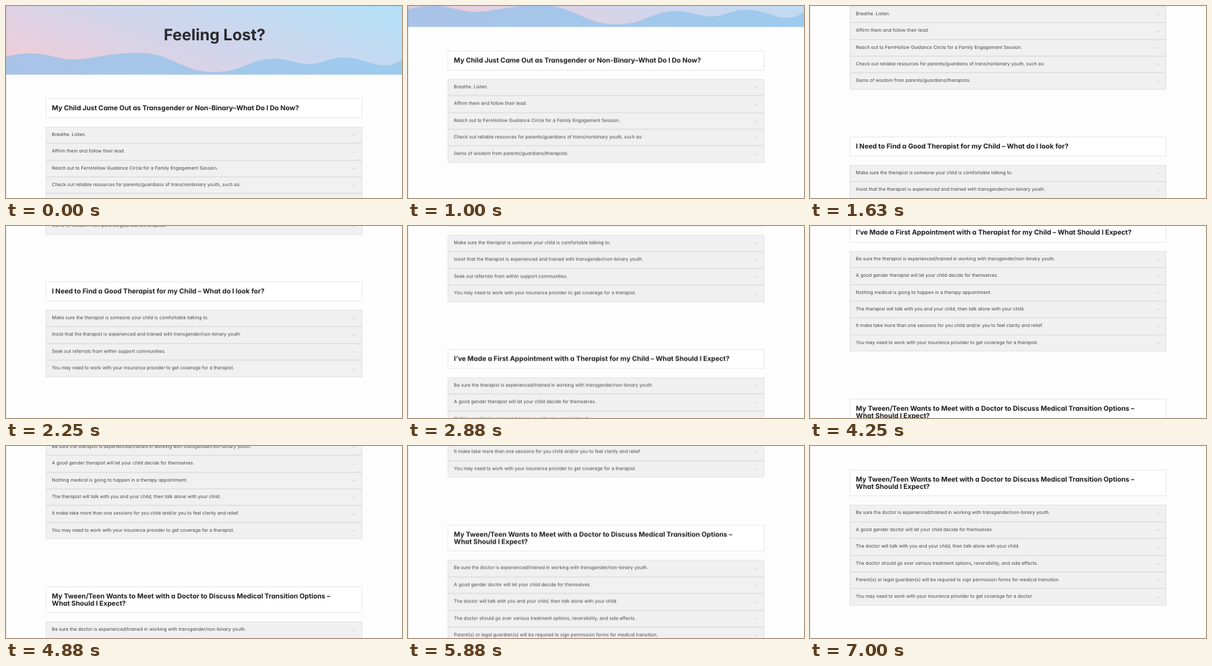
Recreate the animation shown at these times as an HTML page. Size 600 by 291 pixels, loop 7.76 s.

```html
<!DOCTYPE html>
<html lang="en">
<head>
<meta charset="utf-8">
<title>Feeling Lost?</title>
<style>
  * { box-sizing: border-box; margin: 0; padding: 0; }

  html, body {
    width: 100%;
    height: 100%;
    overflow: hidden;
    background: #fdfdfd;
  }

  body {
    position: relative;
    font-family: Inter, "Open Sans", sans-serif;
    font-feature-settings: "cv11";
    font-optical-sizing: none;
    text-rendering: geometricPrecision;
    white-space: nowrap;
  }

  /* thin window edge */
  body::after {
    content: "";
    position: absolute;
    inset: 0 auto 0 0;
    width: 1px;
    background: rgba(120, 120, 130, .16);
  }

  .page {
    position: absolute;
    top: 0;
    left: 0;
    width: 600px;
    height: 1120px;
    padding: 140px 60px 0;
    animation: scroll 7760ms steps(1) -3ms infinite;
  }

  .hero {
    position: absolute;
    top: 0;
    left: 0;
    width: 600px;
    height: 104px;
    background: linear-gradient(20deg, #f6ccd5, #d3d4ea 45%, #b2e0f7);
  }

  .hero svg { position: absolute; top: 0; left: 0; }

  h1 {
    position: absolute;
    top: 30px;
    left: 239px;
    font-size: 23.9px;
    line-height: 28px;
    font-weight: 700;
    color: #2a2a2c;
  }

  section { margin-bottom: 71.5px; }

  h2 {
    margin-bottom: 13.2px;
    padding: 9.1px 8.6px 7.5px;
    border: 1px solid #e7e7e7;
    background: #fff;
    font-size: 10.2px;
    line-height: 11px;
    font-weight: 700;
    color: #1c1c1e;
  }

  ul { list-style: none; }

  li {
    position: relative;
    height: 25.4px;
    padding-left: 8.6px;
    border: 1px solid #e2e2e2;
    background: #f0f0f0;
    font-size: 7.03px;
    line-height: 21.6px;
    color: #444;
  }

  li::after {
    content: "";
    position: absolute;
    top: 9.4px;
    right: 10.5px;
    width: 3px;
    height: 3px;
    border: solid #d2d2d2;
    border-width: 0 1px 1px 0;
    transform: scaleY(.6) rotate(45deg);
  }

  /* the page moves in ticks of 125 ms */
  @keyframes scroll {
    0%, 4.832% { transform: translateY(0); }
    6.443%  { transform: translateY(-4px); }
    8.054%  { transform: translateY(-13px); }
    9.665%  { transform: translateY(-28px);    animation-timing-function: steps(7); }
    20.941% { transform: translateY(-183px);   animation-timing-function: steps(10); }
    37.049% { transform: translateY(-410.5px); animation-timing-function: steps(3); }
    41.881% { transform: translateY(-481px);   animation-timing-function: steps(2); }
    45.103% { transform: translateY(-525px); }
    46.714% { transform: translateY(-540px); }
    48.325% { transform: translateY(-540px);   animation-timing-function: steps(4); }
    54.768% { transform: translateY(-602px);   animation-timing-function: steps(5); }
    62.822% { transform: translateY(-651px);   animation-timing-function: steps(3); }
    67.655% { transform: translateY(-711px); }
    69.265% { transform: translateY(-727px); }
    70.876% { transform: translateY(-737px); }
    72.487% { transform: translateY(-740.5px); }
    74.098% { transform: translateY(-740.5px); }
    75.709% { transform: translateY(-744.5px); animation-timing-function: steps(6); }
    85.374% { transform: translateY(-802.5px); }
    86.985% { transform: translateY(-813px); }
    88.595% { transform: translateY(-822px); }
    90.206%, 100% { transform: translateY(-828px); }
  }
</style>
</head>
<body>
<div class="page">
  <header class="hero">
    <svg width="600" height="104" viewBox="0 0 600 104">
      <defs>
        <linearGradient id="sea">
          <stop offset="0" stop-color="#a9c3e7"/>
          <stop offset="1" stop-color="#9dcbee"/>
        </linearGradient>
      </defs>
      <path fill="url(#sea)" d="M0 77C12 73 25 72 38 72C66 72 78 81 103 81C130 81 155 71 200 71
        C252 71 266 100 316 100C360 100 368 80 406 80C430 80 440 88 459 88
        C480 88 490 78 511 78C540 78 552 90 576 90C587 90 594 85 600 81V104H0Z"/>
    </svg>
    <h1>Feeling Lost?</h1>
  </header>

  <section>
    <h2>My Child Just Came Out as Transgender or Non-Binary–What Do I Do Now?</h2>
    <ul>
      <li>Breathe. Listen.</li>
      <li>Affirm them and follow their lead.</li>
      <li>Reach out to FernHollow Guidance Circle for a Family Engagement Session.</li>
      <li>Check out reliable resources for parents/guardians of trans/nonbinary youth, such as:</li>
      <li>Gems of wisdom from parents/guardians/therapists.</li>
    </ul>
  </section>

  <section>
    <h2>I Need to Find a Good Therapist for my Child – What do I look for?</h2>
    <ul>
      <li>Make sure the therapist is someone your child is comfortable talking to.</li>
      <li>Insist that the therapist is experienced and trained with transgender/non-binary youth.</li>
      <li>Seek out referrals from within support communities.</li>
      <li>You may need to work with your insurance provider to get coverage for a therapist.</li>
    </ul>
  </section>

  <section>
    <h2>I’ve Made a First Appointment with a Therapist for my Child – What Should I Expect?</h2>
    <ul>
      <li>Be sure the therapist is experienced/trained in working with transgender/non-binary youth.</li>
      <li>A good gender therapist will let your child decide for themselves.</li>
      <li>Nothing medical is going to happen in a therapy appointment.</li>
      <li>The therapist will talk with you and your child, then talk alone with your child.</li>
      <li>It make take more than one sessions for you child and/or you to feel clarity and relief.</li>
      <li>You may need to work with your insurance provider to get coverage for a therapist.</li>
    </ul>
  </section>

  <section>
    <h2>My Tween/Teen Wants to Meet with a Doctor to Discuss Medical Transition Options –<br>What Should I Expect?</h2>
    <ul>
      <li>Be sure the doctor is experienced/trained in working with transgender/non-binary youth.</li>
      <li>A good gender doctor will let your child decide for themselves.</li>
      <li>The doctor will talk with you and your child, then talk alone with your child.</li>
      <li>The doctor should go over various treatment options, reversibility, and side effects.</li>
      <li>Parent(s) or legal guardian(s) will be required to sign permission forms for medical transition.</li>
      <li>You may need to work with your insurance provider to get coverage for a doctor.</li>
    </ul>
  </section>
</div>
</body>
</html>
```
